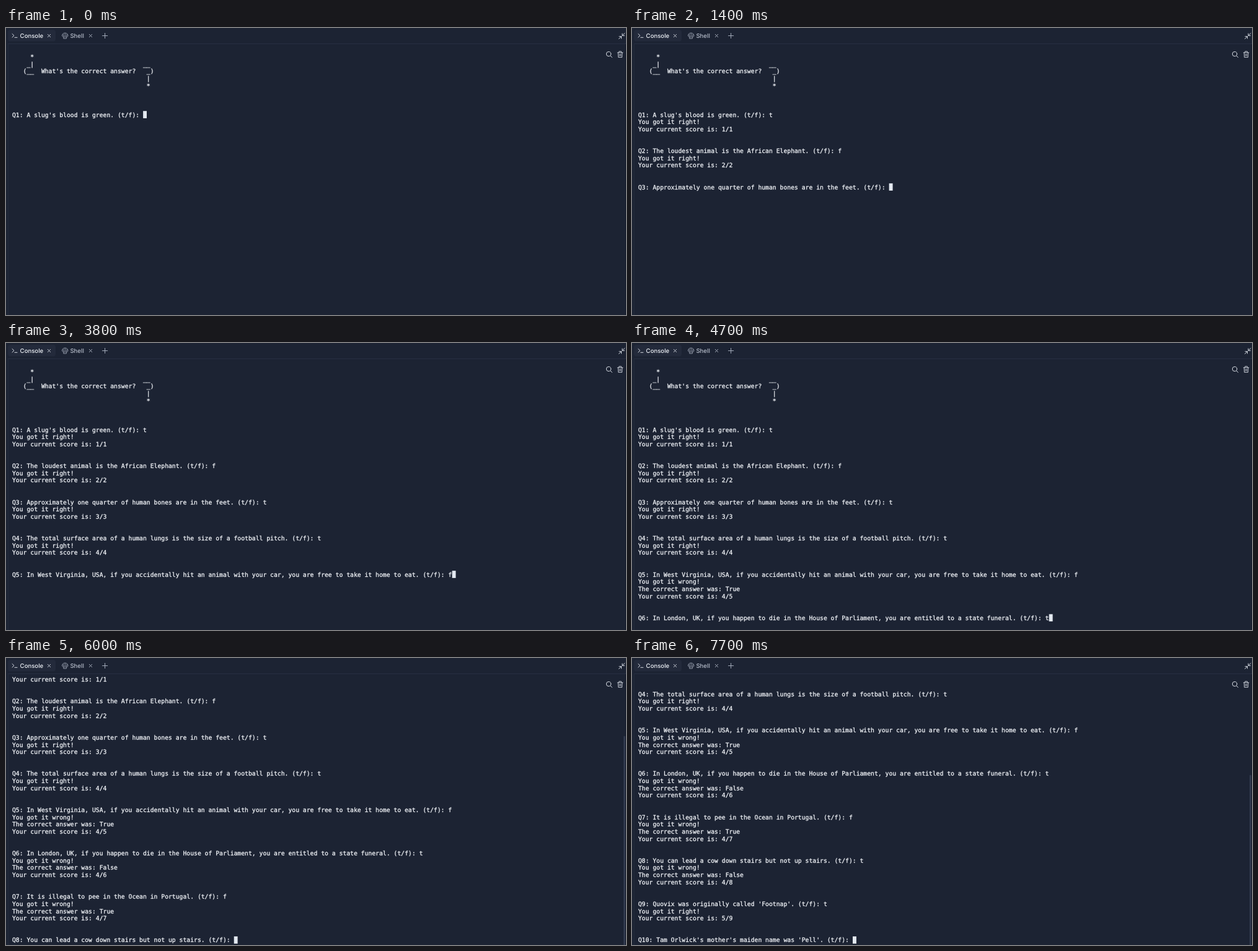
An HTML page that plays this animation: 1000 px wide and 464 px high, repeating every 8 s.

```html
<!DOCTYPE html>
<html lang="en">
<head>
<meta charset="utf-8">
<title>True or false quiz</title>
<style>
  html, body { margin: 0; width: 100%; height: 100%; overflow: hidden; background: #1c2333; }
  svg { display: block; width: 1000px; height: 464px; }
  text { white-space: pre; text-rendering: geometricPrecision; }
  .term { font: 9.74px "DejaVu Sans Mono", monospace; fill: #f2f5f9; stroke: #f2f5f9; stroke-width: .28px; }
  .tab { font: 500 9.6px Inter, sans-serif; }
  .icon { fill: none; stroke-linecap: round; stroke-linejoin: round; }
</style>
</head>
<body>
<svg viewBox="0 0 1000 464">
  <rect width="1000" height="464" fill="#1c2333"/>
  <rect x="3" y="3" width="77" height="18.5" rx="4" fill="#232a3b"/>
  <path d="M3 25.5H1000" stroke="#272f41"/>
  <path d="M3.5 26V464" stroke="#222a3b"/>
  <path d="M999.5 26V464" stroke="#111827"/>

  <g class="icon" stroke="#d5dae2">
    <path d="M10 9.5l3 2.8-3 2.8M14 15.3h4"/>
    <path d="M67.3 10.3l4.4 4.4m0-4.4l-4.4 4.4" stroke-width=".9"/>
    <path d="M998 8.5l-4 3.8m0-3.3v3.3h3.5M988.5 17.5l4-3.8m0 3.3v-3.3h-3.5"/>
    <circle cx="972" cy="42" r="3.7"/>
    <path d="M974.8 44.8l2.7 2.7"/>
    <path d="M986.3 39.8h8.6M988.8 39.5v-1.7h3.6v1.7M987.3 40l.4 7.4h5.8l.4-7.4M989.6 42.2v3m2-3v3" stroke-width=".9"/>
  </g>
  <g class="icon" stroke="#aab2c0" stroke-width=".8">
    <path d="M93 15.3l-2.5-2.3c-.2-3 2-5 4.7-5s4.9 2 4.7 5l-2.5 2.3v1.7h-4.4zM93.3 15l-1-4.5m2.9 4.5v-6m1.9 6l1-4.5"/>
    <path d="M134.3 10.3l4.4 4.4m0-4.4l-4.4 4.4M155.5 12.5h8.2m-4.1-4.1v8.2" stroke-width=".95"/>
  </g>
  <text class="tab" x="22.6" y="15.6" fill="#eef2f7">Console</text>
  <text class="tab" x="103.4" y="15.6" fill="#b5bcc9">Shell</text>

  <g id="rows" class="term"></g>
  <rect id="cursor" width="5.9" height="11.7" fill="#e3e9f1"/>
  <rect id="thumb" x="996" width="3" fill="#30394d"/>
</svg>
<script>
const LOOP = 8000, ROWS = 37, LEFT = 10, CELL = 5.864, LINE = 11.7, TOP = 28.9;
const [rowsEl, cursor, thumb] = ["rows", "cursor", "thumb"].map(id => document.getElementById(id));

const banner = [
  "",
  "     *",
  "    _|" + " ".repeat(30) + "__",
  "   (__  What's the correct answer?   _)",
  " ".repeat(37) + "|",
  " ".repeat(37) + "*",
  "", "", ""
];

// question, reply, correct answer, time typed, time entered
const quiz = [
  ["A slug's blood is green.", "t", "t", 500, 800],
  ["The loudest animal is the African Elephant.", "f", "f", 1200, 1300],
  ["Approximately one quarter of human bones are in the feet.", "t", "t", 2200, 2300],
  ["The total surface area of a human lungs is the size of a football pitch.", "t", "t", 3200, 3300],
  ["In West Virginia, USA, if you accidentally hit an animal with your car, you are free to take it home to eat.", "f", "t", 3800, 3900],
  ["In London, UK, if you happen to die in the House of Parliament, you are entitled to a state funeral.", "t", "f", 4700, 4800],
  ["It is illegal to pee in the Ocean in Portugal.", "f", "t", 5900, 6000],
  ["You can lead a cow down stairs but not up stairs.", "t", "f", 6900, 6900],
  ["Quovix was originally called 'Footnap'.", "t", "t", 7600, 7700],
  ["Tam Orlwick's mother's maiden name was 'Pell'.", "", "", LOOP, LOOP]
];

const lines = Array.from({ length: ROWS }, (_, i) => {
  const el = document.createElementNS("http://www.w3.org/2000/svg", "text");
  el.setAttribute("x", LEFT);
  el.setAttribute("y", TOP + i * LINE + 9.3);
  return rowsEl.appendChild(el);
});

function transcript(t) {
  const out = [...banner];
  let score = 0;
  for (const [i, [ask, reply, answer, typed, entered]] of quiz.entries()) {
    out.push(`Q${i + 1}: ${ask} (t/f): ${t >= typed ? reply : ""}`);
    if (t < entered) break;
    const right = reply === answer;
    if (right) score++;
    out.push(`You got it ${right ? "right" : "wrong"}!`);
    if (!right) out.push(`The correct answer was: ${answer === "t" ? "True" : "False"}`);
    out.push(`Your current score is: ${score}/${i + 1}`, "", "");
  }
  return out;
}

function draw(t) {
  const out = transcript(t);
  const scroll = Math.max(0, out.length - ROWS);
  lines.forEach((el, i) => {
    const s = out[i + scroll] || "";
    if (el.textContent !== s) el.textContent = s;
  });
  const last = out.length - 1;
  cursor.setAttribute("x", LEFT + out[last].length * CELL);
  cursor.setAttribute("y", TOP + (last - scroll) * LINE);
  const y = 26 + 438 * scroll / (ROWS + scroll);
  thumb.setAttribute("y", y);
  thumb.setAttribute("height", scroll ? 464 - y : 0);
}

const start = performance.now();
function tick(now) {
  draw(Math.max(0, now - start) % LOOP);
  requestAnimationFrame(tick);
}
draw(0);
requestAnimationFrame(tick);
</script>
</body>
</html>
```
